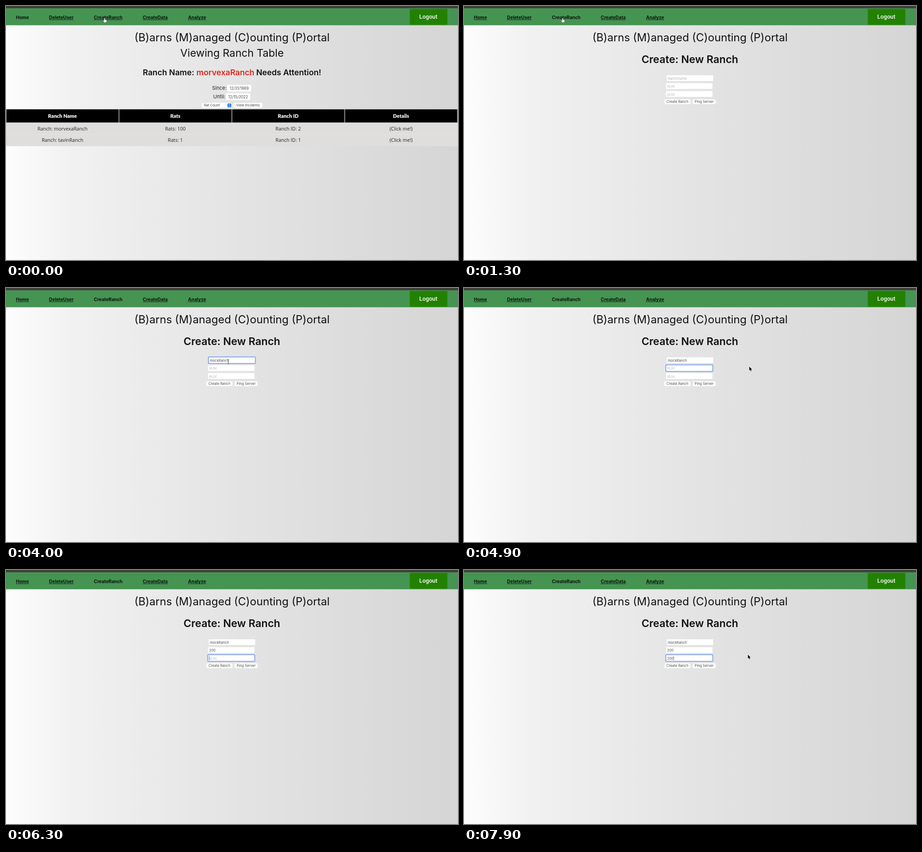
Animation of 998x561 px, one loop 8000 ms. Source, as an HTML page with a canvas:

```html
<!DOCTYPE html>
<html lang="en">
<head>
<meta charset="utf-8">
<title>Ranch form demo</title>
<style>
  html, body { margin: 0; width: 100%; height: 100%; overflow: hidden; background: #e6e6e6; }
  canvas { display: block; }
</style>
</head>
<body>
<canvas id="stage" width="998" height="561"></canvas>
<script>
const ctx = document.getElementById('stage').getContext('2d');
const LOOP = 8000;
const PAGE_SWITCH = 1300;
const INTER = 'Inter, sans-serif';
const SMALL = `7.6px ${INTER}`;
const INK = '#111';
const SOFT_INK = '#4a4a4a';

const backdrop = ctx.createLinearGradient(0, 0, 998, 0);
backdrop.addColorStop(0, '#fdfdfd');
backdrop.addColorStop(0.15, '#f1f1f1');
backdrop.addColorStop(0.5, '#e4e4e4');
backdrop.addColorStop(1, '#d5d5d5');

function rect(x, y, w, h, color) {
  ctx.fillStyle = color;
  ctx.fillRect(x, y, w, h);
}

function text(value, x, y, font, color = INK, align = 'left') {
  ctx.font = font;
  ctx.fillStyle = color;
  ctx.textAlign = align;
  ctx.fillText(value, x, y);
}

function centered(value, x, y, font, color) {
  text(value, x, y, font, color, 'center');
}

function roundBox(x, y, w, h, radius, fill, stroke, lineWidth = 1) {
  ctx.beginPath();
  ctx.roundRect(x, y, w, h, radius);
  ctx.fillStyle = fill;
  ctx.fill();
  if (!stroke) return;
  ctx.strokeStyle = stroke;
  ctx.lineWidth = lineWidth;
  ctx.stroke();
}

function button(label, x, y, w) {
  roundBox(x, y + 0.6, w, 11, 2.5, '#cfcfcf');
  roundBox(x, y, w, 11, 2.5, '#fff');
  centered(label, x + w / 2, y + 8.2, SMALL, SOFT_INK);
}

function drawHeader(activeLink) {
  rect(0, 0, 998, 561, backdrop);
  rect(0, 0, 998, 5, '#443d3b');
  rect(0, 5, 998, 37.5, '#459452');
  const links = [['Home', 22], ['DeleteUser', 95], ['CreateRanch', 194], ['CreateData', 302], ['Analyze', 402]];
  for (const [label, x] of links) {
    text(label, x, 28.7, `700 10px ${INTER}`, '#0a140b');
    if (label !== activeLink) rect(x, 30, ctx.measureText(label).width, 0.8, '#0a140b');
  }
  rect(891.5, 6.5, 83, 35, '#228200');
  centered('Logout', 932.5, 28.4, '500 12.7px Roboto, sans-serif', '#fff');
  centered('(B)arns (M)anaged (C)ounting (P)ortal', 499, 78, `400 24px ${INTER}`);
}

function dateRow(label, labelX, value, boxX, y) {
  text(label, labelX, y + 11, `11px ${INTER}`, '#222');
  rect(boxX, y, 53.5, 15, '#fff');
  centered(value, boxX + 26.8, y + 11.2, `8.4px ${INTER}`, SOFT_INK);
}

function drawTable() {
  const columns = [
    ['Ranch Name', 'Ranch: morvexaRanch', 'Ranch: tavinRanch'],
    ['Rats', 'Rats: 100', 'Rats: 1'],
    ['Ranch ID', 'Ranch ID: 2', 'Ranch ID: 1'],
    ['Details', '(Click me!)', '(Click me!)'],
  ];
  rect(0, 227.5, 998, 30.5, '#c9c9c9');
  rect(0, 258, 998, 51.5, '#e0dddd');
  rect(0, 283.5, 998, 0.8, '#e8e6e6');
  columns.forEach(([head, ...cells], i) => {
    const x = 1 + i * 249.2;
    rect(x, 228.3, 247.8, 28.9, '#000');
    centered(head, x + 123.7, 246.6, '900 11.2px Lato, sans-serif', '#fff');
    cells.forEach((cell, row) =>
      centered(cell, x + 123.7, 275 + row * 25.4, '10.7px "Open Sans", sans-serif', '#222'));
  });
}

function drawTablePage() {
  drawHeader('Home');
  centered('Viewing Ranch Table', 499, 112, `400 23.2px ${INTER}`);
  const alertFont = `600 17.7px ${INTER}`;
  text('Ranch Name:', 302, 152.7, alertFont);
  centered('morvexaRanch', 484.5, 152.7, alertFont, '#e0251b');
  text('Needs Attention!', 696, 152.7, alertFont, INK, 'right');
  dateRow('Since:', 455, '12/31/1969', 488, 174);
  dateRow('Until:', 457.5, '12/15/2022', 485.7, 192.7);

  button('', 432, 214, 67);
  text('Rat Count', 437, 222.2, SMALL, SOFT_INK);
  roundBox(489, 215.2, 8.6, 8.6, 2, '#2f7ced');
  ctx.strokeStyle = '#fff';
  ctx.lineWidth = 0.9;
  ctx.stroke(new Path2D('M491.5 218.6l1.8-1.8 1.8 1.8M491.5 220.4l1.8 1.8 1.8-1.8'));
  button('View Incidents', 502.5, 214, 63.5);
  drawTable();
}

function field({ x, y, placeholder, value, focused, caret }) {
  roundBox(x, y + 0.6, 102.5, 13, 0, '#d2d2d2');
  roundBox(x, y, 102.5, 13, 0, '#fff');
  if (focused) roundBox(x - 0.7, y - 0.8, 103.8, 14.6, 1.5, '#fff', '#86a6ee', 2);
  text(value || placeholder, x + 2.3, y + 9.6, SMALL, value ? SOFT_INK : '#b2b2b2');
  if (focused && caret) {
    rect(x + 2.3 + ctx.measureText(value).width, y + 2, 0.9, 9.5, '#777');
  }
}

function typed(t, value, times) {
  return value.slice(0, times.filter(time => t >= time).length);
}

function caretVisible(t) {
  // Each key press restarts the half-second blink.
  const restarts = [2600, 3500, 4300, 5500, 5700, 6000, 6300, 6900, 7300, 7500];
  const last = restarts.filter(time => time <= t).pop();
  return last !== undefined && Math.floor((t - last) / 500) % 2 === 0;
}

function drawFormPage(t) {
  drawHeader('CreateRanch');
  centered('Create: New Ranch', 498.7, 126, `600 23.1px ${INTER}`);
  const focus = t < 2600 ? -1 : t < 4300 ? 0 : t < 6300 ? 1 : 2;
  const caret = caretVisible(t);
  [
    { x: 447.6, y: 153, placeholder: 'Ranchname', value: t >= 3500 ? 'mockRanch' : '' },
    { x: 446.2, y: 170.5, placeholder: 'xLoc', value: typed(t, '200', [5500, 5700, 6000]) },
    { x: 446.2, y: 187.9, placeholder: 'yLoc', value: typed(t, '200', [6900, 7300, 7500]) },
  ].forEach((options, i) => field({ ...options, focused: i === focus, caret }));
  button('Create Ranch', 442.3, 206.2, 57.7);
  button('Ping Server', 504.7, 206.2, 51);
}

const cursors = {
  arrow: new Path2D('M0 0V8.6L2 6.8L3.4 10L4.9 9.3L3.5 6.3H6.1Z'),
  hand: new Path2D('M-.9 .7Q0-.6.9.7V3.6L4.2 4.5Q5 4.9 4.8 6L3.9 10H-.7L-3 6.3Q-3.2 5.2-2.2 5.2L-.9 6.4Z'),
  beam: new Path2D('M-1.5 0Q0 0 0 1V9.5Q0 10.5-1.5 10.5M1.5 0Q0 0 0 1V9.5Q0 10.5 1.5 10.5'),
};

function drawCursor(kind, x, y) {
  ctx.save();
  ctx.translate(x, y);
  ctx.lineWidth = 1;
  if (kind === 'beam') {
    ctx.lineWidth = 0.8;
    ctx.strokeStyle = '#666';
    ctx.stroke(cursors.beam);
  } else {
    ctx.strokeStyle = kind === 'hand' ? '#111' : '#fff';
    ctx.fillStyle = kind === 'hand' ? '#fff' : '#000';
    ctx.stroke(cursors[kind]);
    ctx.fill(cursors[kind]);
  }
  ctx.restore();
}

function drawPointer(t) {
  if (t < 1400) drawCursor('hand', 217.5, 26.5);
  else if (t < 2000) {
    const s = (t - 1380) / 620;
    const eased = s * s * (3 - 2 * s);
    drawCursor('arrow', 217 + 273 * eased, 27 + 132 * eased);
  } else if (t < 4300) drawCursor('beam', 491, 157.5);
  else if (t >= 4600 && t < 5500) drawCursor('arrow', 629.9, 173.7);
  else if (t >= 7900) drawCursor('arrow', 626.8, 187);
}

function frame() {
  const t = Math.floor(performance.now() % LOOP / 100) * 100;
  if (t < PAGE_SWITCH) drawTablePage();
  else drawFormPage(t);
  drawPointer(t);
  requestAnimationFrame(frame);
}
frame();
</script>
</body>
</html>
```
